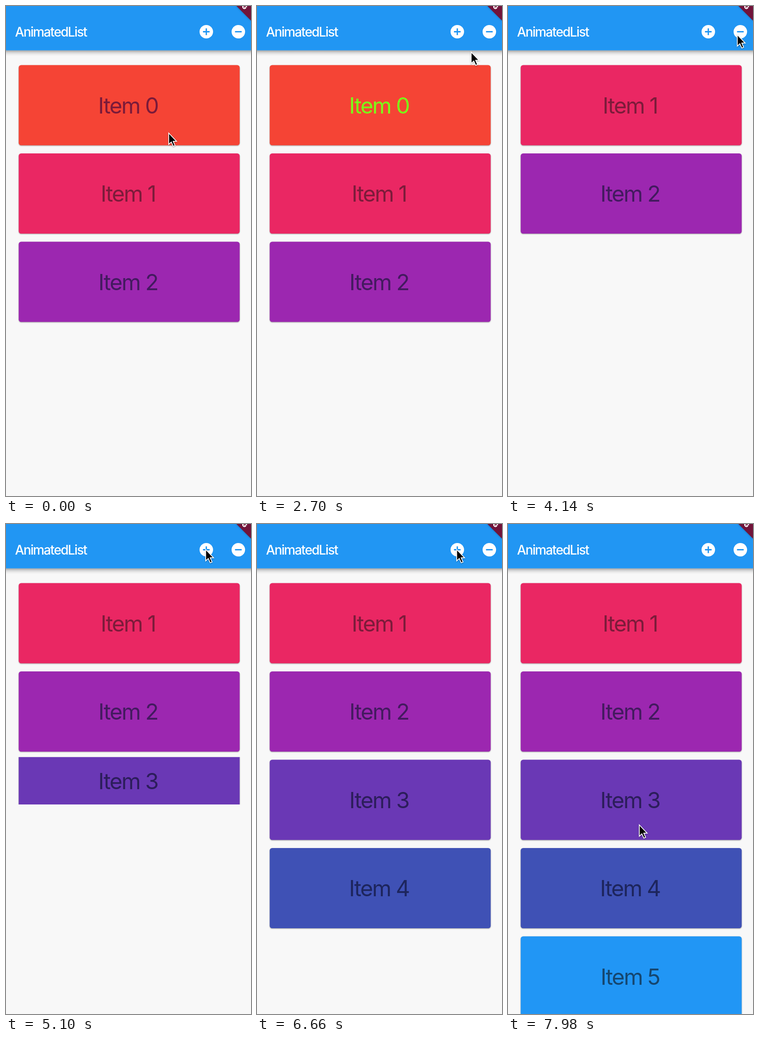
Recreate the animation shown at these times as an HTML page. Size 530 px wide and 1057 px high, loop 8 s.

```html
<!DOCTYPE html>
<html lang="en">
<head>
<meta charset="utf-8">
<title>AnimatedList</title>
<style>
  html, body { margin: 0; width: 100%; height: 100%; overflow: hidden; background: #f8f8f8; }
  #stage { display: block; width: 100%; height: 100%; }
  text { font-family: Inter, Roboto, sans-serif; font-optical-sizing: none; }
  .title { font-size: 28px; font-weight: 500; letter-spacing: -1.65px; fill: #fff; }
  .label { font-size: 48px; letter-spacing: -2.2px; text-anchor: middle; }
  .card { filter: drop-shadow(0 1.4px 1px rgba(0, 0, 0, .38)); }
</style>
</head>
<body>
<svg id="stage" viewBox="0 0 530 1057" preserveAspectRatio="none">
  <defs>
    <linearGradient id="barShade" x2="0" y2="1">
      <stop offset="0" stop-color="#000" stop-opacity=".36"/>
      <stop offset=".3" stop-color="#000" stop-opacity=".17"/>
      <stop offset=".65" stop-color="#000" stop-opacity=".05"/>
      <stop offset="1" stop-color="#000" stop-opacity="0"/>
    </linearGradient>
    <clipPath id="barClip"><path d="M0 0H530V95.7H0Z"/></clipPath>
    <filter id="blur" x="-50%" y="-50%" width="200%" height="200%"><feGaussianBlur stdDeviation="2.5"/></filter>
  </defs>
  <rect width="530" height="1057" fill="#f8f8f8"/>
  <g id="list"></g>

  <rect y="95.5" width="530" height="13" fill="url(#barShade)"/>
  <rect width="530" height="95.7" fill="#2196f3"/>
  <g clip-path="url(#barClip)">
    <circle id="ripple" cy="55.5" r="49.5" fill="#8f8a80" opacity="0"/>
  </g>
  <text class="title" x="19.5" y="66">AnimatedList</text>
  <g fill="#fff" stroke="#2196f3" stroke-width="2.9">
    <circle cx="433.3" cy="55.5" r="14.6" stroke="none"/>
    <path d="M426.1 55.5h14.4M433.3 48.3v14.4"/>
    <circle cx="502.6" cy="55.5" r="14.6" stroke="none"/>
    <path d="M495.4 55.5h14.4"/>
  </g>

  <path d="M498 -2L532 32V-2Z" fill="#000" opacity=".5" filter="url(#blur)"/>
  <path d="M498.5 0L530 31.5V0Z" fill="#71143a"/>
  <text transform="translate(516 1.5) rotate(45)" text-anchor="middle" y="5" font-size="14" font-weight="900" fill="#fff">G</text>

  <g id="cursor">
    <path d="M0 0V24.5L5.6 19.4L9.8 28.7L13.7 27L9.7 17.8H17Z" fill="#000" stroke="#fff" stroke-width="1.7"
      style="filter:drop-shadow(0 1px 1px rgba(0,0,0,.35))"/>
  </g>
</svg>
<script>
const LOOP = 8000, STEP = 60;
const LIST_TOP = 118.8, PAD = 2.9, SLOT = 184.7, MARGIN = 5.8;
const RATE = 0.0045;
const REMOVE_AT = 3360, REMOVE_RATE = 0.0048, SELECT_AT = 1320;
const PLUS_X = 433.3, MINUS_X = 502.6;
const GREEN = '#7bff18';

// fill, label colour, insertion time
const ITEMS = [
  ['#f54435', '#7a1a3a', null],
  ['#ea2763', '#7c1b3a', null],
  ['#9c27b0', '#431a5f', null],
  ['#6a38b5', '#2c1d5b', 4977],
  ['#3f51b5', '#1d255d', 5827],
  ['#2196f5', '#15466f', 6692]
];

// time, x, y
const PATH = [
  [0, 352, 274], [300, 352, 274], [1140, 370, 206], [2100, 370, 206],
  [3000, 496, 62], [4200, 496, 62], [4740, 432, 55], [7140, 432, 55],
  [7860, 284, 649], [8000, 284, 649]
];

const byId = id => document.getElementById(id);
const clamp = v => Math.max(0, Math.min(1, v));
const smooth = p => p * p * (3 - 2 * p);

function make(tag, attrs, parent) {
  const el = document.createElementNS('http://www.w3.org/2000/svg', tag);
  set(el, attrs);
  return parent.appendChild(el);
}

function set(el, attrs) {
  for (const k in attrs) el.setAttribute(k, attrs[k]);
}

const rows = ITEMS.map(([fill, ink, added], i) => {
  const view = make('svg', { x: 0, width: 530, overflow: 'hidden' }, byId('list'));
  const body = make('g', {}, view);
  make('rect', { class: 'card', x: 27.5, y: MARGIN, width: 478, height: SLOT - 2 * MARGIN, rx: 5.4, fill }, body);
  const label = make('text', { class: 'label', x: 264, y: SLOT / 2 + 17.8, fill: ink }, body);
  label.textContent = 'Item ' + i;
  return { view, body, label, ink, added };
});

const removal = t => (t - REMOVE_AT) * REMOVE_RATE;

// Visible share of a row, or null when it is not in the list
function share(row, i, t) {
  if (i === 0) return removal(t) < 1 ? 1 - clamp(removal(t)) : null;
  if (row.added === null) return 1;
  return t < row.added ? null : clamp((t - row.added) * RATE);
}

function drawList(t) {
  let y = LIST_TOP;
  rows.forEach((row, i) => {
    const f = share(row, i, t);
    row.view.style.display = f ? '' : 'none';
    if (f === null) return;
    const h = SLOT * f;
    set(row.view, { y: y + PAD, height: h });
    set(row.body, { transform: `translate(0 ${(h - SLOT) / 2})` });
    y += h + 2 * PAD;
  });
  const selected = t >= SELECT_AT && t <= REMOVE_AT;
  set(rows[0].label, { fill: selected ? GREEN : rows[0].ink });
}

function drawRipple(t) {
  const taps = [[removal(t), MINUS_X]];
  for (const row of rows) if (row.added) taps.push([(t - row.added) * RATE, PLUS_X]);
  const tap = taps.find(([p]) => p > 0 && p < 0.5);
  set(byId('ripple'), tap
    ? { cx: tap[1], opacity: 0.23 * clamp((0.5 - tap[0]) / 0.2) }
    : { opacity: 0 });
}

function drawCursor(t) {
  const n = PATH.findIndex(k => k[0] > t);
  const [t0, x0, y0] = PATH[n - 1], [t1, x1, y1] = PATH[n];
  const p = smooth((t - t0) / (t1 - t0));
  set(byId('cursor'), { transform: `translate(${x0 + (x1 - x0) * p} ${y0 + (y1 - y0) * p})` });
}

function draw(ms) {
  const t = Math.floor((ms % LOOP) / STEP) * STEP;
  drawList(t);
  drawRipple(t);
  drawCursor(t);
}

const start = performance.now();
function tick() {
  draw(performance.now() - start);
  requestAnimationFrame(tick);
}
tick();
</script>
</body>
</html>
```
